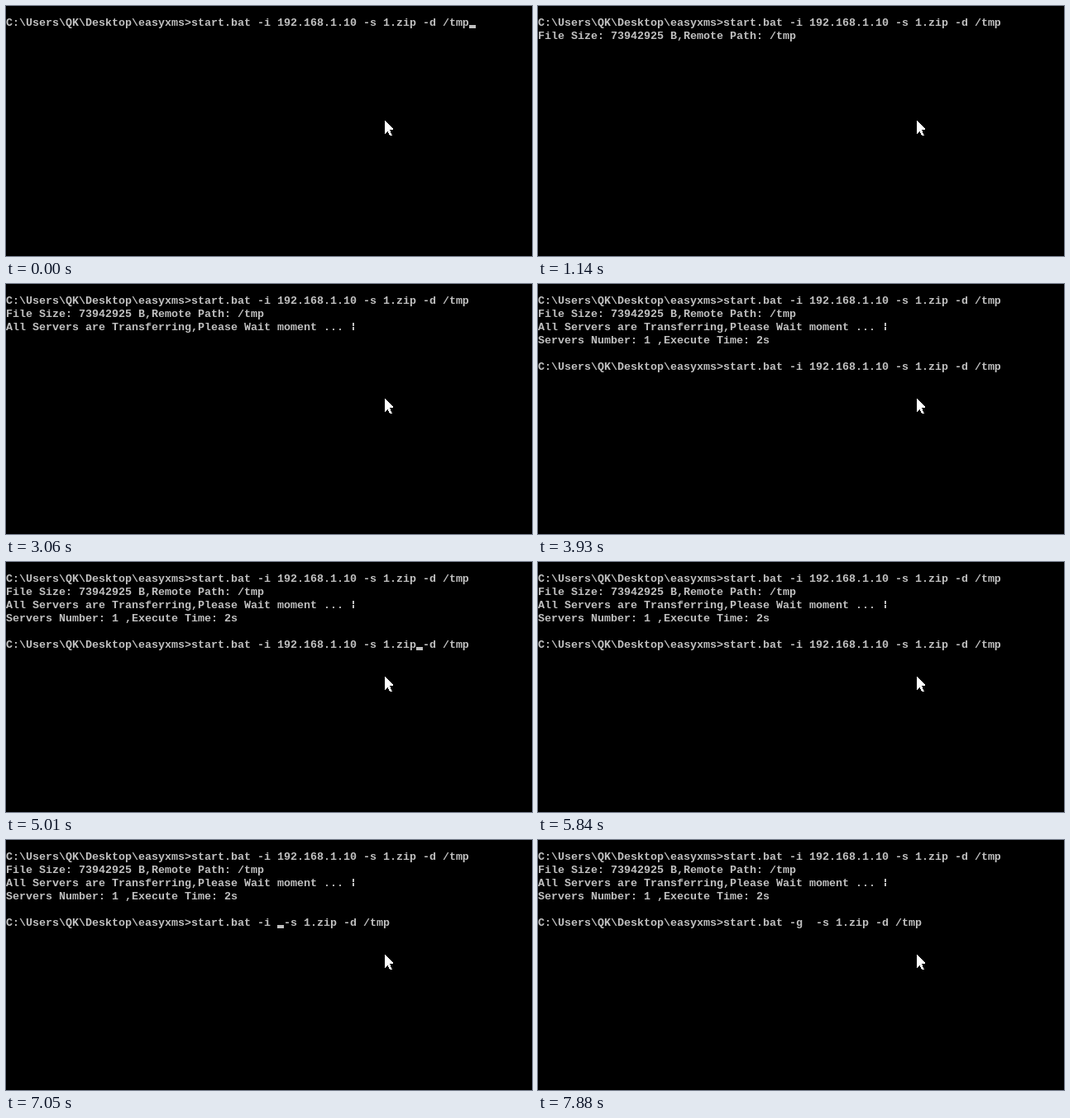
An HTML page that plays this animation: 636x303 px, repeating every 8000 ms.

```html
<!DOCTYPE html>
<html lang="en">
<head>
<meta charset="utf-8">
<style>
  html, body { margin: 0; width: 100%; height: 100%; overflow: hidden; background: #000; }
  svg { display: block; width: 636px; height: 303px; background: #000; }
  text { font: bold 13.333px "Liberation Mono", "Courier New", monospace; fill: #c0c0c0; white-space: pre; }
  #caret { fill: #c0c0c0; mix-blend-mode: difference; }
  #bar { fill: none; stroke: #c0c0c0; stroke-width: 2; }
</style>
</head>
<body>
<svg viewBox="0 0 636 303">
  <g id="screen"></g>
  <path id="bar" d="M420 47v4m0 1v4"/>
  <rect id="caret" width="8" height="4"/>
  <path fill="#fff" shape-rendering="crispEdges"
    d="M458 139L468 149V150H464L466.5 156V157H464L461.5 151.5L458 155Z"/>
</svg>
<script>
const LOOP = 8000, CELL = 8, ROW = 16;
const PROMPT = 'C:\\Users\\QK\\Desktop\\easyxms>';
const HEAD = 'start.bat -i 192.168.1.10', TAIL = ' -s 1.zip -d /tmp';
const SENT = 1140, WAITING = 1420, DONE = 3340, RECALLED = 3930;
const caretSpans = [[0, 120], [640, 890], [4330, 5840], [5960, 6390], [6510, 7880]];

const $ = id => document.getElementById(id);
const clamp = (x, max) => Math.max(0, Math.min(max, x));

// key presses so far: one every gap ms
const taps = (t, from, gap, max) => clamp(1 + Math.floor((t - from) / gap), max);
// a held key: one press, then auto-repeat after half a second
const hold = (t, from, max) => taps(t, from, 1, 1) + taps(t, from + 500, 29, max - 1);
// the console repaints at a fixed rate
const repaint = t => 58 + 137.2 * Math.floor((t - 58) / 137.2);

const rows = Array.from({ length: 6 }, (_, i) => {
  const el = document.createElementNS('http://www.w3.org/2000/svg', 'text');
  el.setAttribute('y', 24 + i * ROW);
  return $('screen').appendChild(el);
});

function spinner(t) {
  const step = Math.floor((Math.min(t, 3060) - WAITING) / 262);
  return step < 0 ? '' : '-\\|/'[step % 4];
}

// command text and caret position while the recalled line is edited
function editLine(t) {
  const left = hold(t, 4310, TAIL.length);
  const erased = hold(t, 5925, 11) + taps(t, 6900, 130, 3);
  const head = HEAD.slice(0, HEAD.length - erased) + 'g '.slice(0, taps(t, 7460, 400, 2));
  return { text: head + TAIL, caret: head.length + TAIL.length - left };
}

function draw(t) {
  const spin = spinner(t), line = editLine(repaint(t));
  [
    PROMPT + HEAD + TAIL,
    t >= SENT ? 'File Size: 73942925 B,Remote Path: /tmp' : '',
    spin && 'All Servers are Transferring,Please Wait moment ... ' + spin.replace('|', ''),
    t >= DONE ? 'Servers Number: 1 ,Execute Time: 2s' : '',
    '',
    t >= DONE ? PROMPT + (t >= RECALLED ? line.text : '') : ''
  ].forEach((s, i) => {
    if (rows[i].textContent !== s) rows[i].textContent = s;
  });
  $('bar').style.display = spin === '|' ? '' : 'none';
  const lit = caretSpans.some(([from, to]) => t >= from && t < to);
  $('caret').style.display = lit ? '' : 'none';
  $('caret').setAttribute('x', (PROMPT.length + line.caret) * CELL);
  $('caret').setAttribute('y', 23 + (t < DONE ? 0 : 5) * ROW);
}

const start = performance.now();
function tick() {
  draw((performance.now() - start) % LOOP);
  requestAnimationFrame(tick);
}
tick();
</script>
</body>
</html>
```
